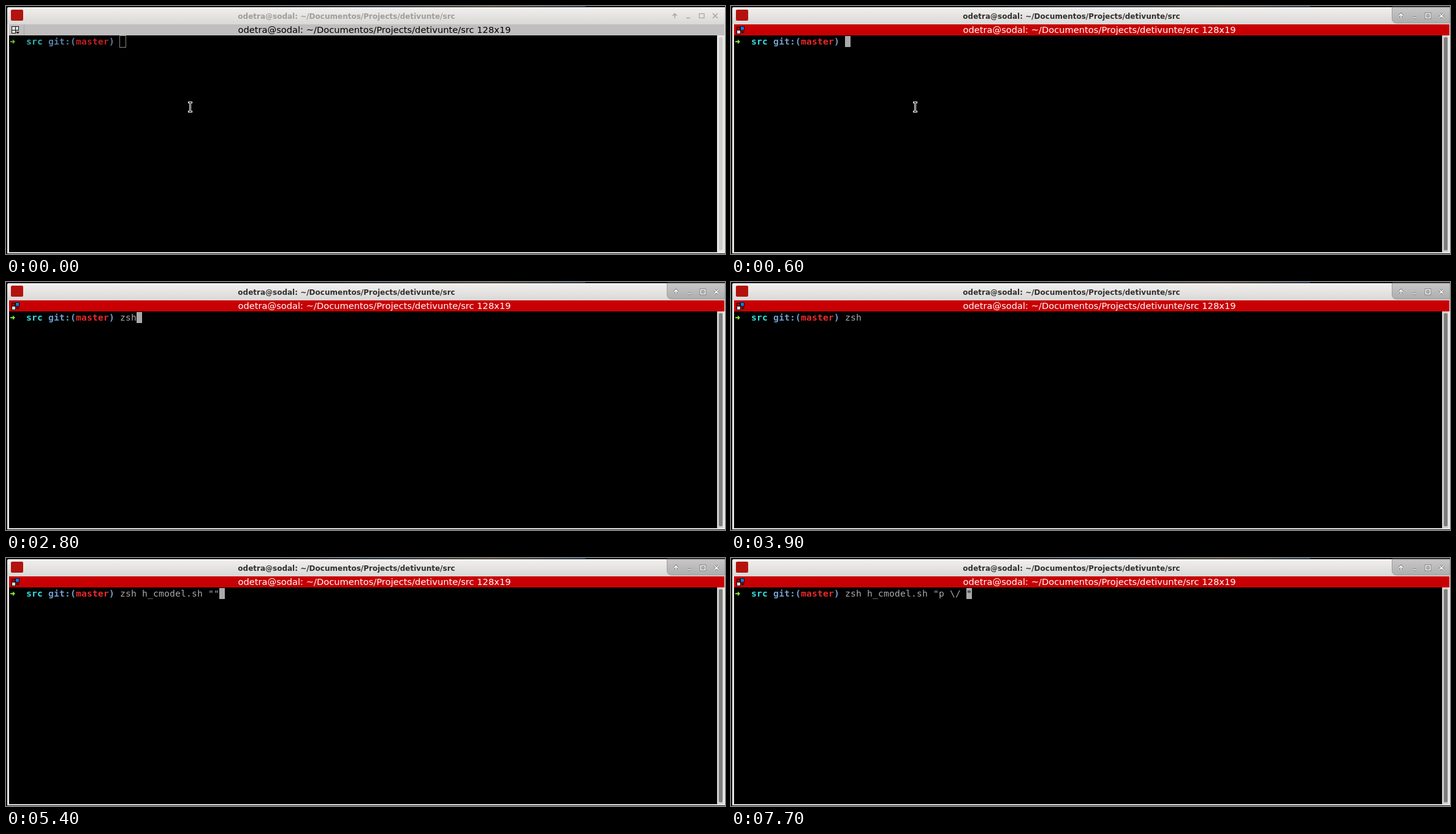
Animation of 1173 by 405 pixels, one loop 8000 ms. Source, as an HTML page:

```html
<!DOCTYPE html>
<html lang="en">
<head>
<meta charset="utf-8">
<title>Terminal</title>
<style>
  html, body { margin: 0; width: 100%; height: 100%; overflow: hidden; background: #000; }
  svg { display: block; }
  text { white-space: pre; }
  .mono { font: 14.667px "DejaVu Sans Mono", monospace; }
  .bold { font-weight: bold; }
  .title { font: bold 12px "DejaVu Sans", sans-serif; text-anchor: middle; }
  .sub { font: 14.667px "DejaVu Sans", sans-serif; text-anchor: middle; }
</style>
</head>
<body>
<svg width="1173" height="405" viewBox="0 0 1173 405">
  <defs>
    <linearGradient id="bar" x2="0" y2="1">
      <stop stop-color="#f1f0ef"/><stop offset="1" stop-color="#dad8d6"/>
    </linearGradient>
    <linearGradient id="panel" x2="0" y2="1">
      <stop stop-color="#c9c8c8"/><stop offset="1" stop-color="#aeadad"/>
    </linearGradient>
    <linearGradient id="wall">
      <stop stop-color="#10161c"/><stop offset=".35" stop-color="#35506a"/>
      <stop offset=".7" stop-color="#8a7448"/><stop offset="1" stop-color="#2f5a86"/>
    </linearGradient>
  </defs>

  <!-- window frame -->
  <rect width="1173" height="405" fill="#101010"/>
  <rect x="450" width="495" height="1" fill="url(#wall)"/>
  <path d="M2 404V5q0-3 3-3H1173V404z" fill="#e9e8e7"/>
  <path d="M2 30V5q0-3 3-3H1173V30z" fill="url(#bar)"/>
  <path d="M4 2.5H1173" stroke="#fafafa"/>
  <rect x="8" y="6" width="20" height="18" rx="2" fill="#b3130f"/>
  <rect x="5" y="48" width="1155" height="354" fill="#000"/>
  <text id="title" class="title" x="555.5" y="21"></text>
  <rect id="subBar" x="5" y="30" width="1167" height="18"/>
  <text id="sub" class="sub" x="601" y="44"></text>
  <rect id="track" x="1160" y="48" width="10" height="354"/>
  <rect id="thumb" x="1163" y="51" width="6" height="348" rx="2"/>

  <!-- inactive controls -->
  <g id="idle">
    <path d="M29.5 30V48" stroke="#aaa8a9"/>
    <rect x="9.5" y="33.5" width="11" height="11" fill="#e4e2e3" stroke="#111"/>
    <path d="M15.500 33V45M9 39.500H21" stroke="#111"/>
    <path d="M16 40h6v6h-6z" fill="#c0bebf"/>
    <path d="M15.500 39.500h5.500M15.500 39.500v5.500" stroke="#111"/>
    <path d="M16 42h6l-3 3.500z" fill="#111"/>
    <g fill="none" stroke="#a5a4a4" stroke-width="1.500">
      <path d="M1091 20V13M1087.500 16l3.500-3.500 3.500 3.500M1110 19.500h6"/>
      <rect x="1131" y="12.500" width="8" height="7" stroke-width="1.200"/>
      <path d="M1153 12l8 8M1161 12l-8 8"/>
    </g>
  </g>

  <!-- active controls -->
  <g id="live">
    <path d="M1078.500 2V20q0 8 8 8H1173V2z" fill="url(#panel)" stroke="#9d9c9c"/>
    <rect x="9.500" y="34.500" width="5" height="5" fill="#9c0808" stroke="#2a0000"/>
    <rect x="15.500" y="33.500" width="6" height="6" fill="#1479e0" stroke="#111"/>
    <rect x="9.500" y="39.500" width="6" height="6" fill="#d9d7d7" stroke="#111"/>
    <path d="M16 41.500h6l-3 3.500z" fill="#111"/>
    <g id="marks" fill="none"></g>
  </g>

  <!-- shell line -->
  <path id="arrow" d="M7 57.200h4V54.500l4 3.700-4 3.700V59.200H7z"/>
  <g id="prompt"></g>
  <rect id="hollow" x="185.500" y="48.500" width="10" height="19" fill="none" stroke="#888"/>
  <text id="typed" class="mono" y="63" fill="#aaa"></text>
  <rect id="block" y="49" width="9" height="18" fill="#aaa"/>
  <text id="under" class="mono" y="63" fill="#000"></text>

  <!-- mouse pointer -->
  <g id="mouse" fill="none" stroke-linecap="square">
    <path d="M298.500 157.500h4M298.500 172.500h4M300.500 157.500V172.500" stroke="#fff" stroke-width="3"/>
    <path d="M298.500 157.500h4M298.500 172.500h4M300.500 157.500V172.500" stroke="#000"/>
  </g>
</svg>
<script>
const LOOP = 8000, CELL = 9, LEFT = 6, START = 20;
const $ = id => document.getElementById(id);
const colX = col => LEFT + col * CELL;
const show = (id, on) => $(id).setAttribute('visibility', on ? 'visible' : 'hidden');
const fill = (id, color) => $(id).setAttribute('fill', color);

// Places one character per terminal cell.
function setCells(el, text, col) {
  el.textContent = text;
  el.setAttribute('x', [...text].map((c, i) => colX(col + i)).join(' ') || '0');
}

const path = 'odetra@sodal: ~/Documentos/Projects/detivunte/src';
$('title').textContent = path;
$('sub').textContent = path + ' 128x19';

// Prompt parts: text, column, colour without focus, colour with focus.
const parts = [
  ['src', 3, '#2ab5b5', '#34e2e2'],
  ['git:(', 7, '#5b7fa6', '#729fcf'],
  ['master', 12, '#bf2121', '#ef2929'],
  [')', 18, '#5b7fa6', '#729fcf']
].map(([text, col, dim, lit]) => {
  const el = document.createElementNS('http://www.w3.org/2000/svg', 'text');
  el.setAttribute('class', 'mono bold');
  el.setAttribute('y', 63);
  setCells(el, text, col);
  $('prompt').append(el);
  return { el, dim, lit };
});

// Light window buttons with a dark rim.
const glyphs = 'M1093 19.500V13.500M1089.500 16.500l3.500-3.500 3.500 3.500' +
  'M1112.500 19h5M1133.500 12.500h7v7h-7zM1155.500 12.500l7 7M1162.500 12.500l-7 7';
$('marks').innerHTML = [['#77777a', 3.4], ['#fff', 1.6]]
  .map(([c, w]) => `<path d="${glyphs}" stroke="${c}" stroke-width="${w}"/>`).join('');

// Start time, command line, cursor offset, cursor visible.
const cmd = 'zsh h_cmodel.sh ';
const steps = [
  [0, '', 0, true],
  [1100, '', 0, false],
  [1700, '', 0, true],
  [2300, '', 0, false],
  [2700, 'zs', 2, true],
  [2800, 'zsh', 3, true],
  [3300, 'zsh', 3, false],
  [3400, 'zsh ', 4, true],
  [3900, 'zsh ', 4, false],
  [4300, 'zsh h', 5, true],
  [4600, cmd, 16, true],
  [5300, cmd + '"', 17, true],
  [5400, cmd + '""', 18, true],
  [5500, cmd + '""', 17, true],
  [6200, cmd + '"p"', 18, true],
  [6300, cmd + '"p "', 19, true],
  [7100, cmd + '"p \\/"', 21, true],
  [7700, cmd + '"p \\/ "', 22, true]
];

function draw(t) {
  const focus = t >= 500;
  const [, line, pos, on] = steps.filter(s => s[0] <= t).pop();
  const cursor = focus && on;

  fill('title', focus ? '#303030' : '#9f9e9e');
  fill('subBar', focus ? '#c80003' : '#c0bebf');
  fill('sub', focus ? '#fff' : '#000');
  fill('track', focus ? '#d2d1d0' : '#e9e8e7');
  fill('thumb', focus ? '#7e7e7e' : '#cecdcc');
  fill('arrow', focus ? '#8ae234' : '#6eb52a');
  parts.forEach(p => p.el.setAttribute('fill', focus ? p.lit : p.dim));
  show('idle', !focus);
  show('live', focus);
  show('hollow', !focus);
  show('mouse', t < 2700);

  setCells($('typed'), line, START);
  $('block').setAttribute('x', colX(START + pos));
  show('block', cursor);
  setCells($('under'), cursor ? line[pos] || '' : '', START + pos);
}

function tick() {
  draw(performance.now() % LOOP);
  requestAnimationFrame(tick);
}
tick();
</script>
</body>
</html>
```
